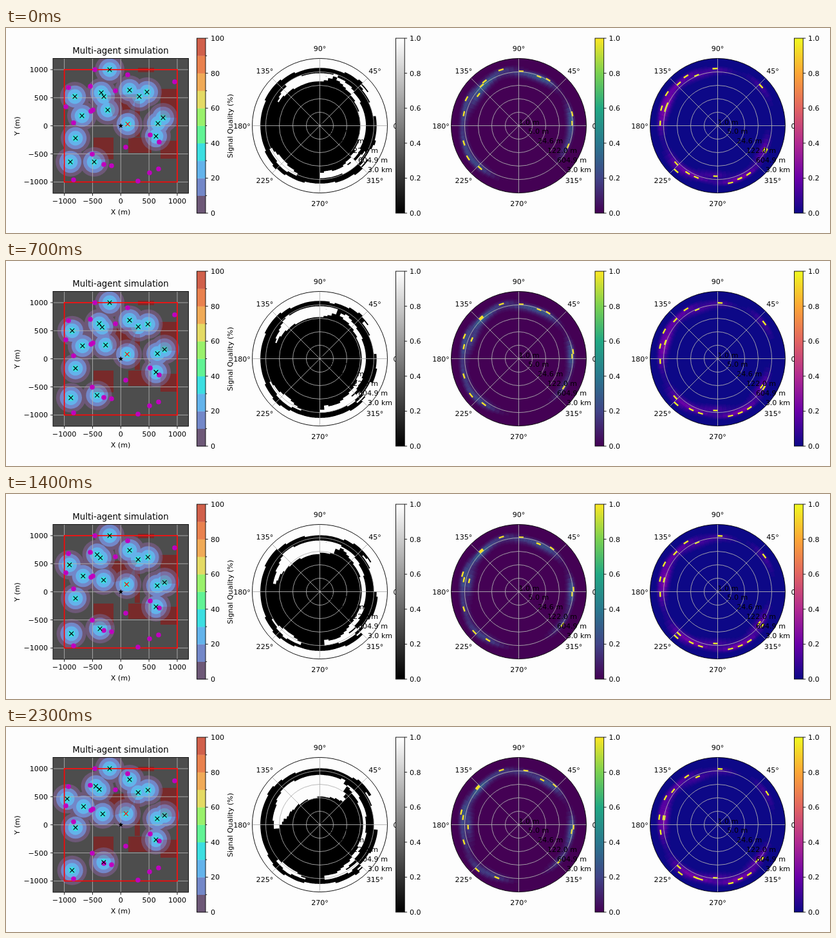
These frames come from a looping animation (1280 by 320 pixels, 2400 ms). An HTML page with a canvas:

```html
<!DOCTYPE html>
<html lang="en">
<head>
<meta charset="utf-8">
<title>Multi-agent simulation</title>
<style>
html, body { margin: 0; width: 100%; height: 100%; overflow: hidden; background: #fdfdfd; }
canvas { display: block; width: 1280px; height: 320px; }
</style>
</head>
<body>
<canvas id="stage" width="1280" height="320"></canvas>
<script>
const ctx = document.getElementById('stage').getContext('2d');
const TAU = Math.PI * 2, DEG = Math.PI / 180;
const STEP = 100, STEPS = 24, SPEED = 0.65;
const SCALE = 0.0877, ORIGIN = { x: 178.3, y: 152.7 };
const FIELD = { x: 90.6, y: 65, size: 175.4 };
const RADIUS = 105, MAX_RANGE = 3000, SECTORS = 72, RINGS = 50, CY = 152.5;
const SMALL = 11.1, LARGE = 13.3, THIN = 0.89, TICK = 3.9;
const GRID = '#b0b0b0', PAGE = '#fdfdfd';

// Start point, heading in degrees and distance to the goal
const observer = agent(189, 150, 100);
const agents = [
  agent(161, 65, 0, 0), agent(107, 107, 203, 13), agent(148, 101, 135, 12),
  agent(152, 107, 126, 12), agent(192, 97, 90), agent(207, 107, 110, 5),
  agent(219, 100, 45, 2), agent(118, 137, 79, 13), agent(158, 128, 225, 11),
  agent(244, 140, 40, 3), agent(236, 149, 100, 6), agent(233, 169, 270, 7),
  agent(108, 172, 90), agent(100, 209, 280), agent(137, 209, 352)
];
const targets = [
  [138, 65], [189, 73], [262, 84], [97, 93], [131, 91], [170, 98], [93, 123],
  [132, 130], [135, 128], [105, 148], [224, 167], [238, 178], [186, 186],
  [134, 197], [152, 213], [164, 215], [237, 220], [223, 226], [205, 239], [105, 237]
];
const zones = [
  [[157, 105], [206, 103], [190, 132], [166, 138]],
  box(200, 114, 8, 56), box(190, 171, 36, 24), box(240, 95, 26, 45),
  box(240, 176, 26, 28), box(136, 171, 31, 34), box(205, 62, 25, 7)
];

const heat = ['#6d5877', '#769ef0', '#3cdee1', '#74fd6e', '#e4da64', '#f69250', '#d0604b'];
const gray = ['#000000', '#ffffff'];
const viridis = ['#440154', '#414487', '#2a788e', '#22a884', '#7ad151', '#fde725'];
const plasma = ['#0d0887', '#6a00a8', '#b12a90', '#e16462', '#fca636', '#f0f921'];

function agent(x, y, heading, travel = 15) {
  return step => {
    const d = Math.min(step * SPEED, travel);
    return [x + d * Math.cos(heading * DEG), y - d * Math.sin(heading * DEG)];
  };
}

function box(x, y, w, h) {
  return [[x, y], [x + w, y], [x + w, y + h], [x, y + h]];
}

function inside(poly, x, y) {
  let hit = false;
  poly.forEach(([ax, ay], i) => {
    const [bx, by] = poly[(i + 1) % poly.length];
    if ((ay > y) !== (by > y) && x < (bx - ax) * (y - ay) / (by - ay) + ax) hit = !hit;
  });
  return hit;
}

function mix(stops, v) {
  const pos = Math.min(v, 0.9999) * (stops.length - 1), i = Math.floor(pos);
  const part = (hex, n) => parseInt(hex.slice(1 + n * 2, 3 + n * 2), 16);
  const rgb = [0, 1, 2].map(n =>
    Math.round(part(stops[i], n) + (part(stops[i + 1], n) - part(stops[i], n)) * (pos - i)));
  return `rgb(${rgb})`;
}

function text(str, x, y, align = 'center', size = SMALL, turn = 0) {
  ctx.save();
  ctx.translate(x, y);
  ctx.rotate(turn);
  ctx.font = `${size}px "DejaVu Sans", sans-serif`;
  ctx.textAlign = align;
  ctx.fillStyle = '#000';
  ctx.fillText(str, 0, size * 0.365);
  ctx.restore();
}

function line(x0, y0, x1, y1, color = '#000', width = THIN) {
  ctx.strokeStyle = color;
  ctx.lineWidth = width;
  ctx.beginPath();
  ctx.moveTo(x0, y0);
  ctx.lineTo(x1, y1);
  ctx.stroke();
}

function circle(x, y, r, fill, stroke) {
  ctx.beginPath();
  ctx.arc(x, y, r, 0, TAU);
  if (fill) { ctx.fillStyle = fill; ctx.fill(); }
  if (stroke) { ctx.strokeStyle = stroke; ctx.lineWidth = THIN; ctx.stroke(); }
}

function frame(x, y, w, h, color = '#000', width = THIN) {
  ctx.strokeStyle = color;
  ctx.lineWidth = width;
  ctx.strokeRect(x, y, w, h);
}

function cross(x, y, color) {
  line(x - 3.3, y - 3.3, x + 3.3, y + 3.3, color, 1.1);
  line(x - 3.3, y + 3.3, x + 3.3, y - 3.3, color, 1.1);
}

function star(x, y) {
  ctx.fillStyle = '#000';
  ctx.beginPath();
  for (let i = 0; i < 10; i++) {
    const r = i % 2 ? 1.7 : 4, a = i * TAU / 10 - TAU / 4;
    ctx.lineTo(x + r * Math.cos(a), y + r * Math.sin(a));
  }
  ctx.fill();
}

function fillZones(alpha) {
  ctx.fillStyle = `rgba(150,20,20,${alpha})`;
  for (const poly of zones) {
    ctx.beginPath();
    poly.forEach(p => ctx.lineTo(...p));
    ctx.fill();
  }
}

function eachTick(visit) {
  for (let m = -1000; m <= 1000; m += 500) {
    visit(ORIGIN.x + m * SCALE, ORIGIN.y - m * SCALE, String(m).replace('-', '\u2212'));
  }
}

function drawMap(spots, center) {
  ctx.save();
  ctx.beginPath();
  ctx.rect(73, 47.5, 210.5, 210.5);
  ctx.clip();
  ctx.fillStyle = '#4d4d4d';
  ctx.fillRect(73, 47, 211, 212);
  fillZones(0.5);
  for (let level = 0; level < 4; level++) {
    for (const [x, y] of [...spots, center]) {
      circle(x, y, 23 - level * 5.8, mix(heat, level / 9));
    }
  }
  fillZones(0.2);
  eachTick((x, y) => {
    line(x, 47, x, 258, GRID);
    line(73, y, 284, y, GRID);
  });
  frame(FIELD.x, FIELD.y, FIELD.size, FIELD.size, '#f00', 1.6);
  targets.forEach(([x, y]) => circle(x, y, 3.8, '#bf00bf'));
  star(ORIGIN.x, ORIGIN.y);
  spots.forEach(([x, y]) => cross(x, y, '#000'));
  cross(...center, '#f00');
  ctx.restore();

  frame(73, 47.5, 210.5, 210.5);
  eachTick((x, y, label) => {
    line(x, 258, x, 258 + TICK);
    line(73 - TICK, y, 73, y);
    text(label, x, 270);
    text(label, 65, y, 'right');
  });
  text('Multi-agent simulation', 178, 35.5, 'center', LARGE);
  text('X (m)', 178, 286.5);
  text('Y (m)', 17, 153, 'center', SMALL, -TAU / 4);
}

function drawHeatBar() {
  const h = 27.3;
  for (let i = 0; i < 10; i++) {
    ctx.fillStyle = mix(heat, i / 9);
    ctx.fillRect(296.5, 289 - (i + 1) * h, 13.5, h + 0.3);
  }
  frame(296.5, 16, 13.5, 273);
  for (let i = 0; i <= 10; i++) {
    const y = 289 - i * h;
    line(310, y, 310 + (i % 2 ? 2.2 : TICK), y);
    if (i % 2 === 0) text(String(i * 10), 318, y, 'left');
  }
  text('Signal Quality (%)', 348, 153, 'center', SMALL, -TAU / 4);
}

function drawBar(x, stops) {
  const fill = ctx.createLinearGradient(0, 289, 0, 16);
  stops.forEach((c, i) => fill.addColorStop(i / (stops.length - 1), c));
  ctx.fillStyle = fill;
  ctx.fillRect(x, 16, 13.7, 273);
  frame(x, 16, 13.7, 273);
  for (let i = 0; i <= 5; i++) {
    const y = 289 - i * 54.6;
    line(x + 13.7, y, x + 13.7 + TICK, y);
    text((i / 5).toFixed(1), x + 21.5, y, 'left');
  }
}

function addCell(cx, sector, ring) {
  const a0 = -sector * TAU / SECTORS, a1 = -(sector + 1) * TAU / SECTORS - 0.003;
  const r = ring * RADIUS / RINGS, outer = Math.min(r + RADIUS / RINGS + 0.2, RADIUS);
  ctx.moveTo(cx + outer * Math.cos(a0), CY + outer * Math.sin(a0));
  ctx.arc(cx, CY, outer, a0, a1, true);
  ctx.arc(cx, CY, r, a1, a0, false);
  ctx.closePath();
}

function fillCell(cx, sector, ring, color) {
  ctx.fillStyle = color;
  ctx.beginPath();
  addCell(cx, sector, ring);
  ctx.fill();
}

function eachCell(visit) {
  for (let s = 0; s < SECTORS; s++) {
    for (let k = 0; k < RINGS; k++) {
      visit(s, k, (s + 0.5) * TAU / SECTORS, (k + 0.5) * RADIUS / RINGS);
    }
  }
}

// One shared path keeps neighbouring white cells free of seams
function drawVisibility(cx, [ox, oy]) {
  circle(cx, CY, RADIUS, '#000');
  const field = box(FIELD.x, FIELD.y, FIELD.size, FIELD.size);
  ctx.beginPath();
  eachCell((s, k, angle, r) => {
    const d = Math.pow(MAX_RANGE, r / RADIUS) * SCALE;
    const x = ox + d * Math.cos(angle), y = oy - d * Math.sin(angle);
    if (!inside(field, x, y) || zones.some(z => inside(z, x, y))) addCell(cx, s, k);
  });
  ctx.fillStyle = PAGE;
  ctx.fill();
}

function drawBelief(cx, [ox, oy], points, stops, gain) {
  const polar = points.map(([x, y]) => ({
    angle: (Math.atan2(oy - y, x - ox) + TAU) % TAU,
    r: RADIUS * Math.log(Math.hypot(x - ox, y - oy) / SCALE) / Math.log(MAX_RANGE)
  }));
  circle(cx, CY, RADIUS, stops[0]);
  eachCell((s, k, angle, r) => {
    if (r < 50) return;
    let v = 0;
    for (const p of polar) {
      const da = Math.abs(angle - p.angle);
      const turn = Math.min(da, TAU - da) / (11 * DEG);
      const dr = (r - p.r + 1) / (r < p.r ? 4.5 : 2.5);
      v += gain * Math.exp(-(turn * turn + dr * dr) / 2);
    }
    if (v > 0.015) fillCell(cx, s, k, mix(stops, Math.min(v, 0.45)));
  });
  for (const p of polar) {
    fillCell(cx, Math.floor(p.angle / TAU * SECTORS), Math.floor(p.r / RADIUS * RINGS),
      stops[stops.length - 1]);
  }
}

function drawPolarAxes(cx) {
  for (let i = 0; i < 8; i++) {
    const a = i * TAU / 8;
    line(cx, CY, cx + RADIUS * Math.cos(a), CY + RADIUS * Math.sin(a), GRID);
    if (i) text(i * 45 + '\u00b0', cx + 121 * Math.cos(a), CY - 121 * Math.sin(a));
  }
  for (let i = 1; i < 5; i++) circle(cx, CY, i * 21, null, GRID);
  circle(cx, CY, RADIUS, null, '#000');
  ['1.0 m', '5.0 m', '24.6 m', '122.0 m', '604.9 m', '3.0 km'].forEach((label, i) =>
    text(label, cx + i * 14.85, CY + i * 14.85 - 6, 'left'));
  text('0\u00b0', cx + 114, CY, 'left');
}

function draw(step) {
  const spots = agents.map(at => at(step)), center = observer(step);
  ctx.fillStyle = PAGE;
  ctx.fillRect(0, 0, 1280, 320);
  drawMap(spots, center);
  drawHeatBar();
  drawVisibility(487.5, center);
  drawBelief(796.5, center, spots, viridis, 0.17);
  drawBelief(1105.5, center, targets, plasma, 0.11);
  [gray, viridis, plasma].forEach((stops, i) => {
    drawPolarAxes(487.5 + i * 309);
    drawBar(605.5 + i * 309.5, stops);
  });
}

let shown = -1;
const start = performance.now();
function tick() {
  const step = Math.floor((performance.now() - start) / STEP) % STEPS;
  if (step !== shown) draw(shown = step);
  requestAnimationFrame(tick);
}
tick();
</script>
</body>
</html>
```
